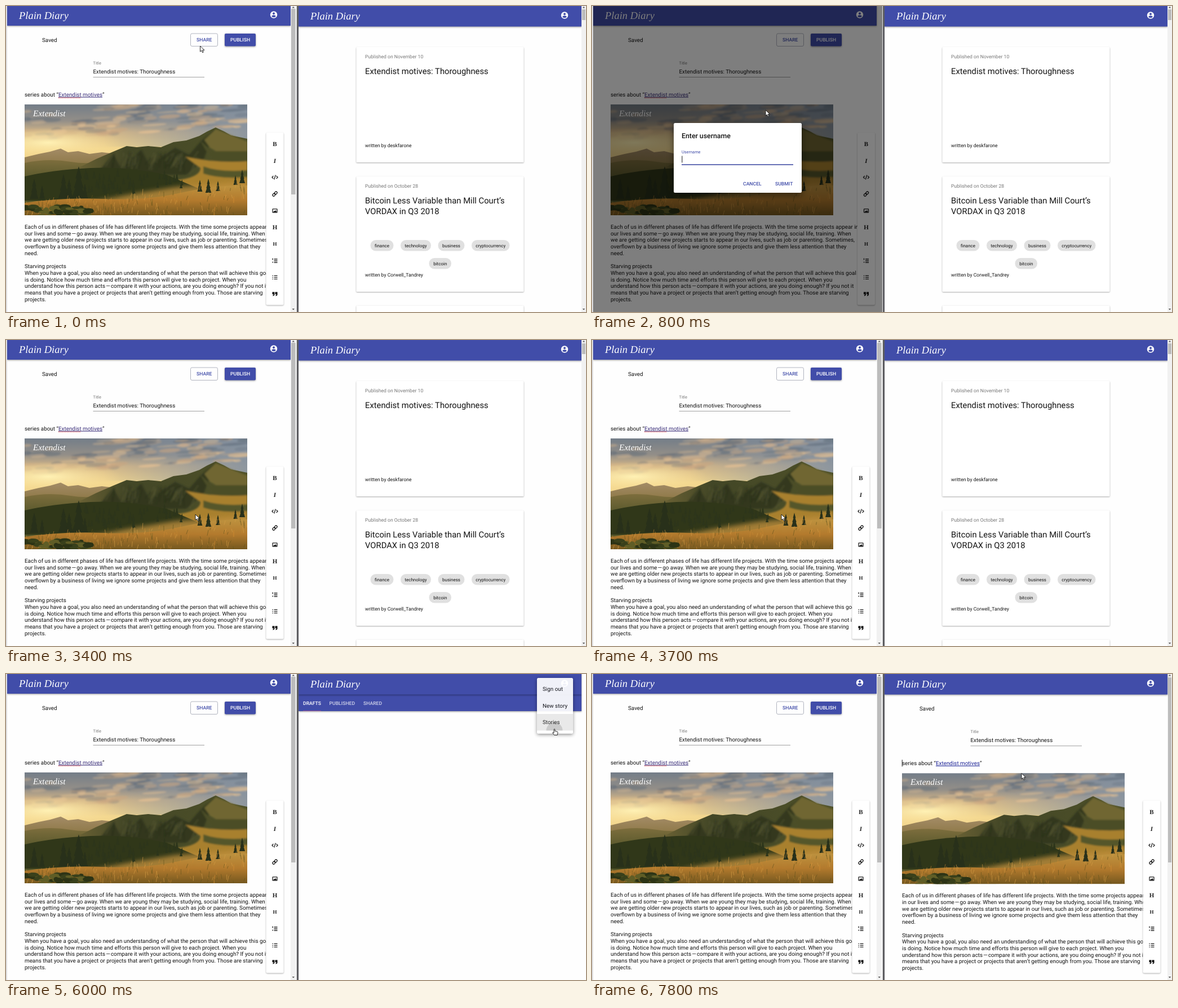
Animation, 1029 px wide and 544 px high, one loop 8 s. Source, as an HTML page:

```html
<!DOCTYPE html>
<html lang="en">
<head>
<meta charset="utf-8">
<title>Story sharing</title>
<style>
html, body { margin: 0; width: 100%; height: 100%; overflow: hidden; background: #fefefe; }
svg { display: block; width: 100vw; height: 100vh; }
text { font: 9.87px Roboto, sans-serif; fill: #141414; white-space: pre; text-rendering: geometricPrecision; }
.small { font-size: 8.64px; }
.tiny { font-size: 7.4px; }
.mute { fill: #777; }
.head { font-size: 14.8px; }
.btn { font-size: 8.64px; font-weight: 500; fill: #414da9; }
.white { fill: #fff; }
.chip { font-size: 8px; text-anchor: middle; }
.script { font: italic 18.5px "Liberation Serif", serif; fill: #fff; }
.slab { font: bold 11px "Liberation Serif", serif; text-anchor: middle; fill: #222; }
.blue { fill: #414da9; }
.card { fill: #fff; filter: drop-shadow(0 1px 1px #0005); }
.bar { filter: drop-shadow(0 1px 1.5px #0006); }
.line { fill: none; stroke: #222; stroke-width: 1.3; }
</style>
</head>
<body>
<svg viewBox="0 0 1029 544" preserveAspectRatio="none">
  <defs>
    <linearGradient id="sky" x1="0" y1="0" x2="0" y2="1">
      <stop offset="0" stop-color="#737d88"/><stop offset=".15" stop-color="#948f88"/>
      <stop offset=".25" stop-color="#d3b688"/><stop offset=".4" stop-color="#f3d78f"/>
    </linearGradient>
    <linearGradient id="east"><stop offset=".35" stop-color="#8592a1" stop-opacity="0"/><stop offset="1" stop-color="#8592a1" stop-opacity=".9"/></linearGradient>
    <radialGradient id="glow"><stop offset="0" stop-color="#fff1b4"/><stop offset="1" stop-color="#fbe09a" stop-opacity="0"/></radialGradient>
    <linearGradient id="far" x1="0" y1="0" x2="0" y2="1"><stop offset="0" stop-color="#a38b66"/><stop offset=".3" stop-color="#8a7541"/></linearGradient>
    <linearGradient id="valley" x1="0" y1="0" x2="0" y2="1"><stop offset="0" stop-color="#81703f"/><stop offset=".4" stop-color="#55562a"/></linearGradient>
    <linearGradient id="ridge"><stop offset="0" stop-color="#6d6335"/><stop offset=".3" stop-color="#424626"/><stop offset="1" stop-color="#4f5129"/></linearGradient>
    <linearGradient id="grass" x1="0" y1="0" x2="0" y2="1"><stop offset="0" stop-color="#bd923f"/><stop offset=".5" stop-color="#b37a2d"/><stop offset="1" stop-color="#75581f"/></linearGradient>
    <filter id="soft"><feGaussianBlur stdDeviation="1.6"/></filter>
    <filter id="haze"><feGaussianBlur stdDeviation="4"/></filter>
    <clipPath id="frame"><path d="M33 175H428V372H33Z"/></clipPath>
    <g id="photo" clip-path="url(#frame)"></g>
    <g id="user">
      <circle r="6.2" fill="#fff"/><circle cy="-2.2" r="2" class="blue"/>
      <path d="M-3.8 2.7C-2.6 .2 2.6 .2 3.8 2.7C2 5.2-2 5.2-3.8 2.7Z" class="blue"/>
    </g>
    <g id="tools">
      <rect class="card" x="-15.5" y="225" width="31" height="306.5" rx="2"/>
      <text class="slab" y="249">B</text>
      <text class="slab" y="279" style="font-style:italic">I</text>
      <path class="line" d="M-2.6 302L-5 304.5L-2.6 307M2.6 302L5 304.5L2.6 307M1.2 300.5L-1.2 308.5"/>
      <g class="line" transform="rotate(-45 0 334)"><rect x="-5" y="332" width="5.6" height="4" rx="2"/><rect x="-.6" y="332" width="5.6" height="4" rx="2"/></g>
      <rect class="line" x="-4" y="360.8" width="8" height="6.4" rx=".6"/><path d="M-3 366.4L-1 363.8L0 365L1.6 363L3.2 366.4Z"/>
      <text class="slab" y="397.3">H</text>
      <text class="slab" y="426.2" style="font-size:9px">H</text>
      <path class="line" d="M-1.5 450H4.5M-1.5 453H4.5M-1.5 456H4.5M-4 448.5V451.5M-4.7 455.5H-3M-1.5 479.4H4.5M-1.5 482.4H4.5M-1.5 485.4H4.5M-4.6 479.4H-3.2M-4.6 482.4H-3.2M-4.6 485.4H-3.2"/>
      <path d="M-4.5 508.6H-.6V512.5Q-.6 515.4-3.6 515.4V514Q-2.2 514-2.2 512.5H-4.5ZM.6 508.6H4.5V512.5Q4.5 515.4 1.5 515.4V514Q2.9 514 2.9 512.5H.6Z"/>
    </g>
    <g id="arrow"><path d="M0 0V10.2L2.4 8L4 11.8L5.8 11L4.2 7.4H7.4Z" fill="#fff" stroke="#111" stroke-width=".9"/></g>
    <g id="hand"><path d="M-.9 .9Q0-.6 .9 .9V4L5.2 5Q6.2 5.4 6 6.8L5.2 11H-.4L-3.2 7.2Q-3.2 5.8-1.8 6.4L-.9 7.2Z" fill="#fff" stroke="#111" stroke-width=".9"/></g>
  </defs>
  <rect width="1029" height="544" fill="#fefefe"/>
  <g id="left">
    <g id="leftEditor"></g>
    <rect id="shareHover" x="327.5" y="49" width="48" height="22.5" rx="2.5" fill="#414da9" fill-opacity=".08"/>
    <rect id="shareEdge" x="327.5" y="49" width="48" height="22.5" rx="2.5" fill="none" stroke-width=".9"/>
    <circle id="shareRipple" cx="349" cy="63" class="blue"/>
    <text class="btn" x="338" y="63.2">SHARE</text>
    <rect class="blue bar" x="388" y="49" width="55" height="22.5" rx="2"/>
    <text class="btn white" x="398" y="63.2">PUBLISH</text>
    <use id="leftTools" href="#tools"/>
    <rect class="blue bar" x="2" y="-8" width="503" height="43"/>
    <text class="script" x="23" y="22.5">Plain Diary</text>
    <use href="#user" x="475" y="15.5"/>
    <g id="leftScroll"></g>
    <rect id="backdrop" x="2" width="513" height="544"/>
    <g id="dialog">
      <rect x="145" y="208" width="227" height="124" rx="2.5" fill="#fff" style="filter:drop-shadow(0 4px 6px #0007)"/>
      <text x="159" y="234.6" style="font-size:12.3px;font-weight:500">Enter username</text>
      <text id="label" x="159">Username</text>
      <text id="typed" x="159" y="276.4"></text>
      <rect id="caret" y="266.5" width=".9" height="12"/>
      <rect x="159" y="282" width="198" height=".7" fill="#888"/>
      <rect id="focus" y="281.3" height="1.5" class="blue"/>
      <circle id="submitRipple" cx="340" cy="315" class="blue"/>
      <text class="btn" x="268" y="318.8">CANCEL</text>
      <text class="btn" x="325" y="318.8">SUBMIT</text>
    </g>
  </g>
  <rect width="2" height="544" fill="#dedee0"/>
  <g id="right">
    <g id="feed"></g>
    <g id="shared">
      <rect class="card" x="621.5" y="103" width="297" height="76" rx="1.5"/>
      <text class="head" x="637" y="146">Extendist motives: Thoroughness</text>
    </g>
    <g id="story">
      <g id="rightEditor" transform="translate(517 1.3)"></g>
      <rect x="549.8" y="152.5" width=".9" height="12"/>
      <use href="#tools" x="993"/>
      <g id="storyScroll"></g>
    </g>
    <g id="tabs">
      <rect id="tabBar" class="blue bar" x="519" y="36" height="30"/>
      <text class="btn white" x="527" y="54.6">DRAFTS</text>
      <text class="btn white" x="573.5" y="54.6" opacity=".75">PUBLISHED</text>
      <text class="btn white" x="634" y="54.6" opacity=".75">SHARED</text>
      <rect id="tabLine" y="65" width="32" height="1" fill="#8a4d9a"/>
      <circle id="tabRipple" cx="650" cy="51" r="15" fill="#fff"/>
    </g>
    <rect id="rightHeader" class="blue bar" x="519" y="-8" height="44.5"/>
    <text class="script" x="540" y="23.8">Plain Diary</text>
    <circle id="iconHover" cx="991" cy="16.5" r="19"/>
    <use id="rightUser" href="#user" y="16.5"/>
    <g id="snack">
      <rect x="519" y="507" width="502" height="37" fill="#323430"/>
      <text class="small white" x="534" y="528.6">deskfarone invited you to edit his story: "Extendist motives: Thoroughness"</text>
      <path d="M992.5 522L999.5 529M999.5 522L992.5 529" stroke="#fff" stroke-width="1.3"/>
    </g>
    <g id="feedScroll"></g>
    <g id="menu">
      <rect class="card" x="942" y="7" width="64" height="99" rx="2.5" style="filter:drop-shadow(0 2px 3px #0007)"/>
      <rect id="itemHover" x="942" y="71" width="64" height="29.5" fill="#e8e8e8"/>
      <path id="itemRipple" d="M958.5 100.5A14.5 14.5 0 0 1 987.5 100.5Z"/>
      <text x="952" y="30">Sign out</text><text x="952" y="59.6">New story</text><text x="952" y="89.2">Stories</text>
    </g>
  </g>
  <rect x="515.8" width="3.3" height="544" fill="#5c5c60"/>
  <use id="cursor"/>
</svg>
<script>
const el = Object.fromEntries([...document.querySelectorAll('[id]')].map(e => [e.id, e]));
const set = (id, attrs) => { for (const k in attrs) el[id].setAttribute(k, attrs[k]); };
const show = (id, on) => set(id, { opacity: +on });
const title = 'Extendist motives';

let seed = 11;
const rnd = (a, b) => a + (b - a) * (seed = seed * 16807 % 2147483647) / 2147483647;
const many = (n, make) => Array.from({ length: n }, (_, i) => make(i)).join('');

function tree(x, y, h, color = '#28301a') {
  const w = h * .2;
  return `<path fill="${color}" d="M${x} ${y - h}l${w * .5} ${h * .38}h${-w * .2}l${w * .45} ${h * .3}h${-w * .2}l${w * .5} ${h * .32}h${-w * 2.1}l${w * .5} ${-h * .32}h${-w * .2}l${w * .45} ${-h * .3}h${-w * .2}Z"/>`;
}

function scenery() {
  const cloud = i => {
    const y = rnd(174, 228), lift = (y - 174) / 54;
    return `<ellipse cx="${rnd(30, 435)}" cy="${y}" rx="${rnd(7, 26)}" ry="${rnd(1.2, 4)}" fill="${['#e6c193', '#5c6875', '#c9a681'][i % 3]}" opacity="${rnd(.4, .75) * (i % 3 === 1 ? 1 - lift * .6 : .6 + lift * .4)}"/>`;
  };
  const blade = i => {
    const x = rnd(33, 428), y = rnd(352 - (x - 33) * .08, 376);
    return `<path stroke="${['#d79f47', '#5f521c', '#c98832'][i % 3]}" opacity=".6" d="M${x} ${y}l${rnd(-2, 3)} ${-rnd(4, 12)}"/>`;
  };
  const bush = i => `<ellipse cx="${rnd(33, 150)}" cy="${rnd(356, 374)}" rx="${rnd(4, 11)}" ry="${rnd(2, 6)}" fill="${['#39401b', '#5f5d26', '#2c3315'][i % 3]}"/>`;
  const wood = () => { const x = rnd(135, 320); return tree(x, rnd(303, 334), rnd(9, 17), '#2d351b'); };
  const slope = i => {
    const x = rnd(185, 345);
    return `<path stroke="${i % 2 ? '#292f1a' : '#565630'}" opacity=".5" stroke-width="2" d="M${x} ${rnd(258, 272)}l${rnd(-14, 2)} ${rnd(12, 30)}"/>`;
  };
  return `<path fill="url(#sky)" d="M33 175H428V372H33Z"/><path fill="url(#east)" d="M33 175H428V250H33Z"/>
    <g filter="url(#soft)" transform="rotate(-4 230 200)">${many(120, cloud)}</g>
    <ellipse cx="75" cy="243" rx="130" ry="26" fill="url(#glow)"/>
    <path fill="url(#far)" d="M33 269L58 263L78 259L97 253.5L110 260L128 258L148 263L170 260L205 264V372H33Z"/>
    <path fill="url(#valley)" d="M33 279Q75 270 115 277T200 270V372H33Z"/>
    <path fill="url(#ridge)" d="M120 292L160 272L190 259L214 249L232 251L252 249L275 251L297 242L320 239L343 231L357 223L372 216L387 223L399 230L428 236V372H120Z"/>
    <g filter="url(#soft)">
      <path fill="#2d331e" opacity=".75" d="M372 217L345 241L325 264L300 252L255 283L240 255L205 290L190 262L160 300H320L350 275Z"/>
      ${many(60, slope)}
      <path fill="#6f6631" d="M372 219L428 241V262L390 268L362 252L352 238Z"/>
      <path fill="#4b4d27" d="M345 240L365 258L428 258V284L370 283Z"/>
      <path fill="#a8802f" d="M318 268Q375 280 428 276V332L350 328L300 310Q345 305 345 288Z"/>
      <path fill="#55572a" d="M350 285Q380 296 428 292V304Q380 308 350 298Z"/>
    </g>
    <path fill="#303719" d="M33 303Q85 291 150 288T285 300L345 326L250 346H33Z"/>
    <path fill="#bf8f3c" opacity=".8" filter="url(#haze)" d="M215 336L300 322L428 312V355H120Z"/>
    <path fill="url(#grass)" d="M33 350Q100 340 175 343T310 332T428 319V372H33Z"/>
    ${many(48, wood)}
    ${tree(50, 343, 36)}${tree(64, 343, 24)}${tree(102, 342, 43)}${tree(129, 342, 57)}${tree(112, 342, 34)}${tree(140, 342, 26)}${tree(344, 330, 21)}${tree(359, 332, 25)}${tree(376, 329, 18)}${tree(419, 315, 24)}${tree(407, 318, 17)}
    ${many(190, blade)}${many(42, bush)}
    <text class="script" x="48" y="196" style="font-size:15.5px">Extendist</text>`;
}

const paragraphs = [
  'Each of us in different phases of life has different life projects. With the time some projects appear in',
  'our lives and some\u200a—\u200ago away. When we are young they may be studying, social life, training. When',
  'we are getting older new projects starts to appear in our lives, such as job or parenting. Sometimes,',
  'overflown by a business of living we ignore some projects and give them less attention that they',
  'need.', '', 'Starving projects',
  'When you have a goal, you also need an understanding of what the person that will achieve this goal',
  'is doing. Notice how much time and efforts this person will give to each project. When you',
  'understand how this person acts\u200a—\u200acompare it with your actions, are you doing enough? If you not it',
  'means that you have a project or projects that aren’t getting enough from you. Those are starving',
  'projects.'];

const editor = (link, prefix, spell) => `
  <text x="64" y="63.7">Saved</text>
  <text class="tiny mute" x="154.5" y="104">Title</text>
  <text x="154.5" y="120.2">${title}: Thoroughness</text>
  <path d="M154.5 126.5H352" stroke="#888" stroke-width=".8"/>
  <text x="33" y="160.7">series about “<tspan fill="${link}" text-decoration="underline">${title}</tspan>”</text>
  ${spell ? '<path d="M93 163.3H133" stroke="#d33" stroke-dasharray="1.5 1"/>' : ''}
  <use href="#photo"/>
  ${paragraphs.map((s, i) => `<text x="33" y="${396 + i * 11.72}">${i === 1 ? prefix : ''}${s}</text>`).join('')}`;

const scroll = (x, w, top, end) => `
  <rect x="${x}" width="${w}" height="544" fill="#f1f1f1"/>
  <rect x="${x + 1}" y="${top}" width="${w - 2}" height="${end - top}" fill="#bcbcbc"/>
  <path fill="#555" d="M${x + w / 2 - 2.2} 3.5h4.4l-2.2-2.5ZM${x + w / 2 - 2.2} 538h4.4l-2.2 2.5Z"/>`;

const post = (y, date, lines, author) => `
  <rect class="card" x="621.5" y="${y}" width="297" height="205" rx="1.5"/>
  <text class="small mute" x="637" y="${y + 19.8}">Published on ${date}</text>
  ${lines.map((s, i) => `<text class="head" x="637" y="${y + 47.5 + i * 19.7}">${s}</text>`).join('')}
  <text class="small" x="637" y="${y + 177.7}">written by ${author}</text>`;

const chip = (name, x, w, y = 425.7) => `
  <rect x="${x}" y="${y - 9.8}" width="${w}" height="19.6" rx="9.8" fill="#e0e0e0"/>
  <text class="chip" x="${x + w / 2}" y="${y + 2.9}">${name}</text>`;

el.photo.innerHTML = scenery();
el.leftEditor.innerHTML = editor('#3a2f7a', '', true);
el.rightEditor.innerHTML = editor('#1c2396', 'in ', false);
el.leftScroll.innerHTML = scroll(505, 9.5, 5, 335);
el.feedScroll.innerHTML = scroll(1021, 8, 6, 25);
el.storyScroll.innerHTML = scroll(1021, 8, 6, 335);
el.feed.innerHTML = post(73, 'November 10', [title + ': Thoroughness'], 'deskfarone')
  + post(303, 'October 28', ['Bitcoin Less Variable than Mill Court’s', 'VORDAX in Q3 2018'], 'Corwell_Tandrey')
  + post(532.5, 'October 20', [], '')
  + chip('finance', 646.5, 41) + chip('technology', 700, 54) + chip('business', 766.5, 47)
  + chip('cryptocurrency', 826, 67.5) + chip('bitcoin', 750.5, 39.5, 457.7);

const clamp = v => Math.min(1, Math.max(0, v));
const ramp = (t, start, length, power = 2) => 1 - (1 - clamp((t - start) / length)) ** power;
const within = (t, a, b) => t >= a && t < b;

// time, x, y of the pointer tip
const path = [[100, 344.5, 71], [300, 349, 63], [400, 349, 63], [600, 330, 118.5], [800, 308, 185],
  [1000, 297, 216.5], [2600, 297, 216.5], [2900, 336, 310], [4100, 336, 310], [4400, 470, 350],
  [4800, 950, 70], [4900, 979, 30.5], [5000, 985, 24], [5300, 985, 24], [5700, 973, 97.5],
  [6100, 973, 97.5], [6400, 650, 50], [6600, 650, 50], [6900, 762, 160], [7100, 762, 168], [7700, 762, 176.5]];
const hands = [[200, 500], [2900, 3400], [4900, 6200], [6400, 6700], [6900, 7200]];
const typing = [[1500, 1], [1600, 2], [1700, 3], [2200, 5], [2500, 6]];

function pointer(t) {
  const i = path.findIndex(p => p[0] > t);
  if (i === 0) return path[0].slice(1);
  if (i < 0) return path.at(-1).slice(1);
  const [a, b] = [path[i - 1], path[i]], p = (t - a[0]) / (b[0] - a[0]);
  return [1, 2].map(k => a[k] + (b[k] - a[k]) * p);
}

function render(t) {
  const [x, y] = pointer(t);
  set('cursor', { x, y, href: hands.some(h => within(t, ...h)) ? '#hand' : '#arrow' });

  const open = ramp(t, 510, 225) * (1 - ramp(t, 3150, 195));
  const locked = open > 0, field = ramp(t, 510, 200, 3);
  show('leftScroll', !locked);
  set('leftTools', { x: locked ? 486.5 : 477 });
  set('backdrop', { opacity: open * .5 });
  set('dialog', { opacity: open });
  set('label', { y: 276.4 - 14.4 * field, style: `font-size:${9.87 - 2.47 * field}px;fill:${t < 700 ? '#777' : '#414da9'}` });
  set('focus', { x: 258 - 99 * field, width: 198 * field });
  const count = typing.reduce((n, [at, c]) => t >= at ? c : n, 0);
  el.typed.textContent = 'bunase'.slice(0, count);
  set('caret', { x: 159.4 + (count ? el.typed.getComputedTextLength() : 0) });
  show('shareHover', within(t, 200, 800));
  set('shareEdge', { stroke: within(t, 200, 800) ? '#414da9' : '#a9acb8' });
  set('shareRipple', { r: 11 * ramp(t, 250, 300), opacity: .2 * (1 - ramp(t, 500, 300)) });
  set('submitRipple', { r: 14 * ramp(t, 3000, 200), opacity: .2 });

  const wide = within(t, 6200, 7700), width = wide ? 510 : 502;
  show('feed', t < 6000);
  show('feedScroll', t < 5200);
  show('tabs', within(t, 6000, 7200));
  show('shared', within(t, 6700, 7200));
  show('story', t >= 7700);
  set('rightHeader', { width });
  set('tabBar', { width });
  set('rightUser', { x: wide ? 999 : 991 });
  set('iconHover', { opacity: within(t, 4900, 5400) ? .08 : 0 });
  set('tabLine', { x: 527 + 107 * ramp(t, 6550, 250) });
  set('tabRipple', { opacity: within(t, 6500, 6700) ? .25 : 0 });

  const rise = t < 3800 ? 0 : t < 4000 ? .8 : 1 - ramp(t, 5100, 200);
  set('snack', { transform: `translate(0 ${37 * (1 - rise)})`, opacity: +(rise > 0) });
  const grow = ramp(t, 5150, 250), scale = .75 + .25 * grow;
  set('menu', {
    opacity: grow * (t < 6000 ? 1 : t < 6100 ? .92 : t < 6200 ? .3 : 0),
    transform: `translate(1006 7) scale(${scale} ${scale * scale}) translate(-1006 -7)`
  });
  show('itemHover', t >= 5600);
  set('itemRipple', { opacity: t >= 6000 ? .14 : 0 });
}

// The picture advances in tenths of a second.
const start = performance.now();
function tick() {
  render(Math.floor((performance.now() - start) % 8000 / 100) * 100);
  requestAnimationFrame(tick);
}
tick();
</script>
</body>
</html>
```
